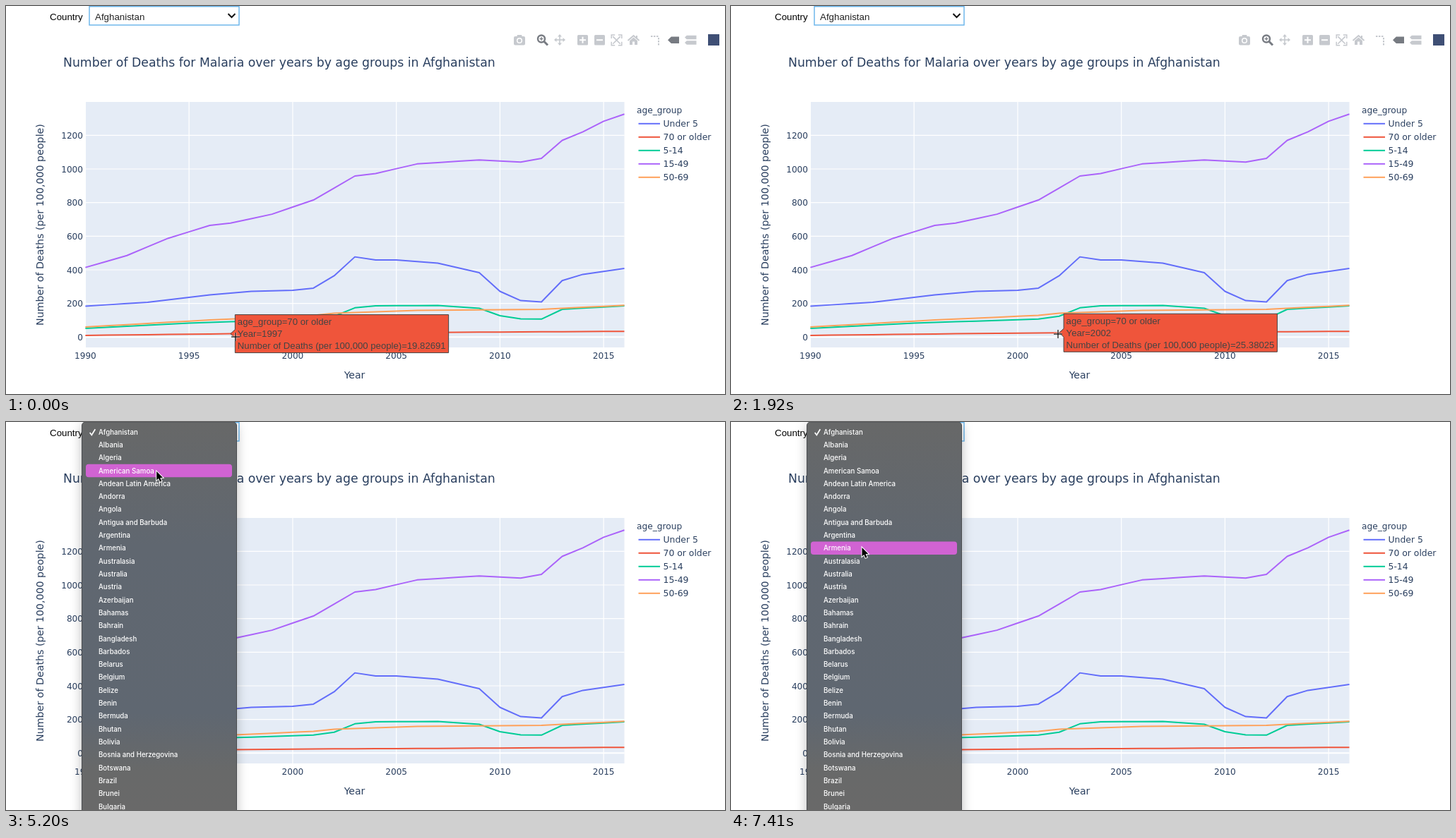
Animation of 1018x550 px, one loop 8 s. Source, as an HTML page with a canvas:

```html
<!DOCTYPE html>
<html lang="en">
<head>
<meta charset="utf-8">
<title>Deaths by age group</title>
<style>
html, body { margin: 0; width: 100%; height: 100%; overflow: hidden; background: #fff; }
canvas { display: block; }
</style>
</head>
<body>
<canvas id="stage" width="1018" height="550"></canvas>
<script>
const ctx = document.getElementById('stage').getContext('2d');
const LOOP = 8000, TICK = LOOP / 54, MENU_TICK = 33;
const INK = '#2a3f5f', CHART = '"DejaVu Sans", sans-serif', UI = '"Liberation Sans", Arial, sans-serif';
const PLOT = { left: 112.4, top: 136, right: 875.5, bottom: 484 };
const AXIS = 'Number of Deaths (per 100,000 people)';

// Bends of each line as [years since 1990, value]
const series = [
  { name: 'Under 5', color: '#636efa', label: '#fff', bends: [[0, 184], [3, 207], [6, 251], [8, 272], [10, 278],
    [11, 290.9147], [12, 364.5324], [13, 477], [14, 459], [15, 459], [17, 440], [19, 383], [20, 272], [21, 217],
    [22, 209], [23, 336], [24, 373], [26, 408]] },
  { name: '70 or older', color: '#ef553b', label: '#444',
    bends: [[0, 10], [7, 19.82691], [12, 25.38025], [14, 25.91366], [26, 34]] },
  { name: '5-14', color: '#00cc96', label: '#444', bends: [[0, 52], [5, 83], [11, 107], [12, 123.8417], [13, 174],
    [14, 186], [17, 188], [19, 171], [20, 127], [21, 108], [22, 107], [23, 165], [26, 186]] },
  { name: '15-49', color: '#ab63fa', label: '#444', bends: [[0, 414], [2, 485], [4, 588], [6, 664], [7, 678],
    [9, 731], [11, 815.2764], [13, 958], [14, 973], [16, 1030], [19, 1054], [21, 1041], [22, 1063], [23, 1170],
    [24, 1221], [25, 1284], [26, 1326]] },
  { name: '50-69', color: '#ffa15a', label: '#444',
    bends: [[0, 60], [6, 102], [11, 129], [12, 141.8263], [16, 159], [22, 165], [26, 189]] }
];

// Pointer path as [tick, x, y]
const path = [
  [0, 325, 469], [2, 437, 283], [4, 437, 283], [6, 458, 368], [7, 449.5, 394], [11, 457, 446],
  [13, 463, 465], [15, 463, 465], [21, 530, 472], [22, 554, 473], [24, 566, 472], [25, 566, 472],
  [30, 281, 23], [32, 202, 16], [39, 227, 141], [40, 205, 176], [45, 189, 255], [46, 189, 255], [50, 185, 177.5]
];

const countries = ('Afghanistan,Albania,Algeria,American Samoa,Andean Latin America,Andorra,Angola,' +
  'Antigua and Barbuda,Argentina,Armenia,Australasia,Australia,Austria,Azerbaijan,Bahamas,Bahrain,' +
  'Bangladesh,Barbados,Belarus,Belgium,Belize,Benin,Bermuda,Bhutan,Bolivia,Bosnia and Herzegovina,' +
  'Botswana,Brazil,Brunei,Bulgaria').split(',');

const px = year => PLOT.left + year * 29.35;
const py = value => 469.3 - value * 0.2383;

function interpolate(keys, at) {
  const i = keys.findIndex(k => k[0] >= at);
  if (i <= 0) return keys.at(i).slice(1);
  const [t0, ...from] = keys[i - 1], [t1, ...to] = keys[i];
  return from.map((v, n) => v + (to[n] - v) * (at - t0) / (t1 - t0));
}

for (const s of series) {
  s.points = Array.from({ length: 27 }, (_, year) => {
    const [value] = interpolate(s.bends, year);
    return { s, year, value, x: px(year), y: py(value) };
  });
}
const allPoints = series.flatMap(s => s.points);

function text(str, x, y, size, family, color, align = 'left', weight = 400) {
  ctx.font = `${weight} ${size}px ${family}`;
  ctx.fillStyle = color;
  ctx.textAlign = align;
  ctx.fillText(str, x, y);
}

function trace(points, color, width, close) {
  ctx.beginPath();
  points.forEach(([x, y]) => ctx.lineTo(x, y));
  if (close) ctx.closePath();
  ctx.strokeStyle = color;
  ctx.lineWidth = width;
  ctx.stroke();
}

function fillShape(points, color) {
  ctx.beginPath();
  points.forEach(([x, y]) => ctx.lineTo(x, y));
  ctx.fillStyle = color;
  ctx.fill();
}

function box(x, y, w, h, color, r = 0) {
  ctx.beginPath();
  ctx.roundRect(x, y, w, h, r);
  ctx.fillStyle = color;
  ctx.fill();
}

function ring(x, y, r, color, width) {
  ctx.beginPath();
  ctx.arc(x, y, r, 0, 7);
  ctx.strokeStyle = color;
  ctx.lineWidth = width;
  ctx.stroke();
}

// Draws a plus sign, or a cross when turned
function plus(x, y, r, color, width, angle = 0) {
  ctx.save();
  ctx.translate(x, y);
  ctx.rotate(angle);
  trace([[-r, 0], [r, 0]], color, width);
  trace([[0, -r], [0, r]], color, width);
  ctx.restore();
}

function drawSelect() {
  text('Country', 62, 19.7, 13.33, UI, '#000');
  ctx.strokeStyle = '#66b3ea';
  ctx.lineWidth = 1.4;
  ctx.strokeRect(118, 0.7, 212, 26.3);
  text('Afghanistan', 126, 19.7, 13.33, UI, '#222');
  trace([[314.5, 11], [319.5, 16], [324.5, 11]], '#111', 2);
}

function drawChart() {
  text('Number of Deaths for Malaria over years by age groups in Afghanistan', 81, 86, 17.28, CHART, INK);
  box(PLOT.left, PLOT.top, PLOT.right - PLOT.left, PLOT.bottom - PLOT.top, '#e5ecf6');
  for (let year = 0; year <= 25; year += 5) {
    trace([[px(year), PLOT.top], [px(year), PLOT.bottom]], '#fff', 1.2);
    text(1990 + year, px(year), 500, 12.1, CHART, INK, 'center');
  }
  for (let v = 0; v <= 1200; v += 200) {
    trace([[PLOT.left, py(v)], [PLOT.right, py(v)]], '#fff', v ? 1.2 : 2);
    text(v, 109, py(v) + 4.6, 12.1, CHART, INK, 'right');
  }
  ctx.lineJoin = 'round';
  text('age_group', 893, 152, 12.2, CHART, INK);
  series.forEach((s, i) => {
    const y = 166.8 + i * 19;
    trace(s.points.map(p => [p.x, p.y]), s.color, 2);
    trace([[895.5, y], [926, y]], s.color, 2);
    text(s.name, 930.5, y + 4.6, 12.4, CHART, INK);
  });
  ctx.lineJoin = 'miter';
  text('Year', 493.5, 528, 14, CHART, INK, 'center');
  ctx.save();
  ctx.translate(53, 310);
  ctx.rotate(-Math.PI / 2);
  text(AXIS, 0, 0, 14.24, CHART, INK, 'center');
  ctx.restore();
}

function drawToolbar() {
  const dim = '#c6c9ce', on = '#777b82';
  // camera
  box(719, 43, 16, 12.5, dim, 2);
  box(723.5, 41, 7, 4, dim, 1);
  ring(727, 49, 3.3, '#fff', 1.5);
  // zoom
  ring(758, 46.5, 5, on, 2.4);
  trace([[762, 50.5], [767, 55.5]], on, 3);
  plus(758, 46.5, 2.5, on, 1.3);
  // pan
  plus(784, 48, 7, dim, 1.6);
  for (let k = 0; k < 4; k++) {
    ctx.save();
    ctx.translate(784, 48);
    ctx.rotate(k * Math.PI / 2);
    fillShape([[8, 0], [4.5, -3], [4.5, 3]], dim);
    ctx.restore();
  }
  // zoom in and out
  box(809, 41, 15, 14.5, dim, 1.5);
  plus(816.5, 48.2, 4.5, '#fff', 2);
  box(833, 41, 15, 14.5, dim, 1.5);
  box(836, 47.2, 9, 2, '#fff');
  // autoscale
  plus(864.5, 48.4, 7.5, dim, 1.6, Math.PI / 4);
  for (const sx of [-1, 1]) for (const sy of [-1, 1]) {
    const x = 864.5 + 7.3 * sx, y = 48.4 + 7.3 * sy;
    trace([[x, y - 5 * sy], [x, y], [x - 5 * sx, y]], dim, 1.5);
  }
  // home
  trace([[880.5, 49], [888.5, 42], [896.5, 49]], dim, 2);
  fillShape([[888.5, 44.5], [894, 49.3], [894, 55], [883, 55], [883, 49.3]], dim);
  box(892, 42, 2, 4, dim);
  box(887, 50.5, 3, 4.5, '#fff');
  // spike lines
  for (let k = 0; k < 3; k++) {
    box(913 + k * 4, 42, 2.5, 2, dim);
    box(923, 45 + k * 4, 2, 2.5, dim);
  }
  // hover modes
  const tag = (x, y, w, r, color) =>
    fillShape([[x, y], [x + r, y - r], [x + w, y - r], [x + w, y + r], [x + r, y + r]], color);
  tag(937, 48.2, 16, 4.8, on);
  tag(961, 44.5, 16.5, 2.8, dim);
  tag(961, 52, 16.5, 2.8, dim);
  box(994, 40, 16, 16, '#3f4f75');
}

function drawLabel({ s, year, value, x, y }) {
  const lines = ['age_group=' + s.name, 'Year=' + (1990 + year), `${AXIS}=${value.toPrecision(7)}`];
  ctx.font = `13.15px ${UI}`;
  const right = 14 + ctx.measureText(lines[2]).width;
  const shape = [[0, 0], [6.5, -6], [6.5, -27], [right, -27], [right, 27], [6.5, 27], [6.5, 6]];
  ctx.save();
  ctx.translate(x, y);
  fillShape(shape, s.color);
  trace(shape, s.label, 1, true);
  lines.forEach((line, i) => text(line, 10, -12.7 + i * 17, 13.15, UI, s.label));
  ctx.restore();
}

function drawMenu(pointerY) {
  const shade = ctx.createLinearGradient(0, 0, 0, 550);
  [[0, '#676868'], [0.32, '#606770'], [0.75, '#5f6771'], [0.9, '#686969'], [1, '#696969']]
    .forEach(([at, c]) => shade.addColorStop(at, c));
  ctx.save();
  ctx.shadowColor = 'rgba(0,0,0,.28)';
  ctx.shadowBlur = 16;
  ctx.shadowOffsetY = 4;
  box(107.5, 0, 219, 570, shade, 5);
  ctx.restore();
  ctx.strokeStyle = '#4b4d50';
  ctx.lineWidth = 1;
  ctx.stroke();

  const pitch = 18.31, active = Math.round((pointerY - 14) / pitch);
  box(113, 4.8 + active * pitch, 207, 18.4, '#d163d3', 4);
  countries.forEach((name, i) =>
    text(name, 131, 17.6 + i * pitch, 9.7, 'Inter, sans-serif', '#fff', 'left', 500));
  trace([[118.7, 15], [121.3, 18.5], [126.3, 10.3]], '#fff', 1.7);
}

function drawCross(x, y) {
  plus(x, y, 6, 'rgba(255,255,255,.6)', 3);
  plus(x, y, 6, '#000', 1.2);
}

function drawArrow(x, y) {
  const shape = [[0.5, 0.5], [0.5, 13], [3.3, 10.4], [5.4, 15.2], [7.6, 14.2], [5.5, 9.6], [9.4, 9.4]];
  ctx.save();
  ctx.translate(x, y);
  trace(shape, '#fff', 2, true);
  fillShape(shape, '#000');
  ctx.restore();
}

// Nearest data point within reach of the pointer
function hovered([x, y]) {
  const distance = p => Math.hypot(p.x - x, p.y - y);
  const best = allPoints.reduce((a, b) => distance(b) < distance(a) ? b : a);
  return distance(best) < 20 ? best : null;
}

function draw(now) {
  const tick = Math.floor((now % LOOP + 7) / TICK);
  const [x, y] = interpolate(path, tick);
  const point = hovered(interpolate(path, tick - 1)); // the label lags one tick behind
  ctx.fillStyle = '#fff';
  ctx.fillRect(0, 0, 1018, 550);
  drawSelect();
  drawChart();
  if (tick < 30) drawToolbar();
  if (tick >= MENU_TICK) drawMenu(y);
  else if (point) drawLabel(point);
  if (tick < MENU_TICK && y > PLOT.top) drawCross(x, y);
  else drawArrow(x, y);
}

const start = performance.now();
function loop() {
  draw(performance.now() - start);
  requestAnimationFrame(loop);
}
loop();
</script>
</body>
</html>
```
